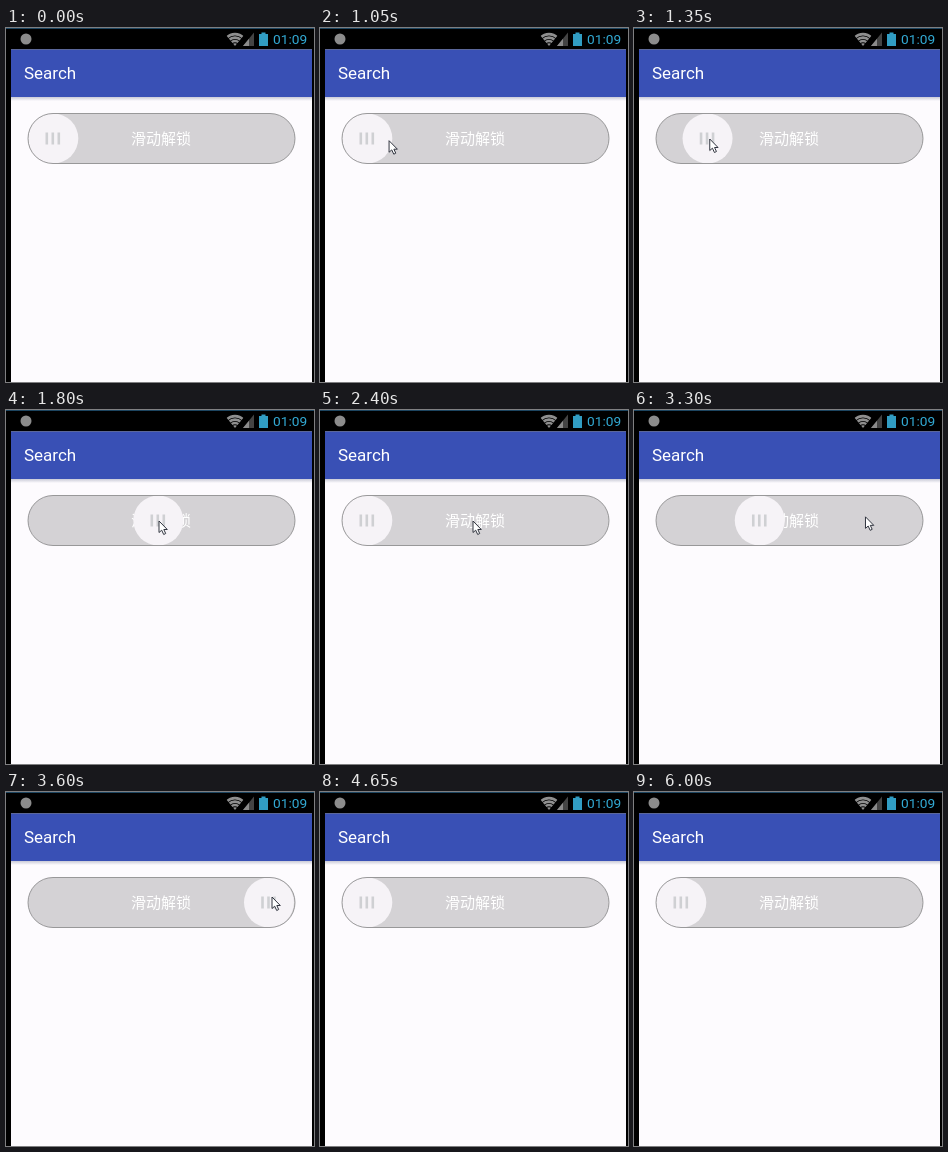
An HTML page for the animation above (6150 ms loop, 308 by 354 pixels).

```html
<!DOCTYPE html>
<html lang="zh">
<head>
<meta charset="utf-8">
<title>Slide to unlock</title>
<style>
  html, body { margin: 0; width: 100%; height: 100%; overflow: hidden; background: #000; }
  svg { display: block; width: 308px; height: 354px; }
  text { font-family: Roboto, "Noto Sans CJK SC", "Noto Sans CJK", sans-serif; }
</style>
</head>
<body>
<svg viewBox="0 0 308 354">
  <defs>
    <linearGradient id="shadow" x2="0" y2="1">
      <stop offset="0" stop-color="#8a8fa8" stop-opacity=".45"/>
      <stop offset="1" stop-color="#8a8fa8" stop-opacity="0"/>
    </linearGradient>
    <clipPath id="fan"><path d="M229 18L219.500 6.500V3H238.500V6.500Z"/></clipPath>
  </defs>

  <rect width="308" height="354"/>
  <rect width="308" height="1" fill="#1d4560"/>

  <!-- Status bar -->
  <circle cx="20" cy="11" r="5.5" fill="#8c8c8c"/>
  <g clip-path="url(#fan)" fill="none" stroke="#8f8f8f" stroke-width="2.700">
    <circle cx="229" cy="18" r="1.500"/>
    <circle cx="229" cy="18" r="5"/>
    <circle cx="229" cy="18" r="8.400"/>
    <circle cx="229" cy="18" r="11.800"/>
  </g>
  <path d="M237 18L248 4.500V18Z" fill="#444"/>
  <path d="M237 18L243 10.700V18Z" fill="#8b8b8b"/>
  <path d="M253 6H255.500V4.500H259.500V6H262V18H253Z" fill="#319dc3"/>
  <text x="267" y="16" font-size="13.700" fill="#32a9d3">01:09</text>

  <!-- App -->
  <rect x="5" y="21.500" width="301" height="333" fill="#fdfbfe"/>
  <rect x="5" y="69" width="301" height="4" fill="url(#shadow)"/>
  <rect x="5" y="21.500" width="301" height="47.500" fill="#3950b5"/>
  <text x="18" y="51" font-size="17" fill="#fff">Search</text>

  <!-- Slider -->
  <rect x="22" y="85.500" width="267" height="50" rx="25" fill="#d4d2d5"/>
  <text x="125" y="116" font-size="15" font-weight="500" fill="#fff">滑动解锁</text>
  <g id="knob">
    <circle r="25" fill="#f6f3f7"/>
    <path d="M-6.500-6V6M-.5-6V6M5.500-6V6" stroke="#cfd0d3" stroke-width="2.600"/>
  </g>
  <rect x="22" y="85.500" width="267" height="50" rx="25" fill="none" stroke="#858486" stroke-width=".8"/>

  <path id="cursor" d="M0 0V11.500L2.700 9.200L4.700 13.500L6.700 12.500L4.800 8.500H8.300Z"
        fill="#fff" stroke="#30343f" stroke-width="1" stroke-linejoin="round"/>
</svg>
<script>
const LOOP = 6150, TICK = 150;
const HOME = 47.3, END = 263, KNOB_Y = 110.5;
const FIRST_DRAG = 105, SECOND_DRAG = 113;

const knob = document.getElementById("knob");
const cursor = document.getElementById("cursor");
const place = (node, x, y) => node.setAttribute("transform", `translate(${x} ${y})`);
const ramp = (t, from, to) => Math.min(1, Math.max(0, (t - from) / (to - from)));

function draw(now) {
  const t = Math.floor((now % LOOP) / TICK) * TICK;

  const enter = ramp(t, 150, 1125);
  const drag = ramp(t, 1200, 1800);
  const springBack = ramp(t, 1950, 2400);
  const pull = ramp(t, 2550, 3450) ** 2;
  const leave = ramp(t, 3900, 4500);

  // The second drag passes the middle, so the knob snaps to the end and then resets.
  let knobX = HOME + FIRST_DRAG * (drag - springBack) + SECOND_DRAG * pull;
  if (t >= 3600) knobX = t < 3900 ? END : HOME;
  place(knob, knobX, KNOB_Y);

  place(cursor,
    298 - 248 * enter + 103 * drag + SECOND_DRAG * pull + 10 * leave,
    133 - 22 * enter - 6 * pull - 17 * leave);
  cursor.setAttribute("visibility", t >= 150 && t < 4650 ? "visible" : "hidden");
}

const start = performance.now();
function tick() {
  draw(performance.now() - start);
  requestAnimationFrame(tick);
}
tick();
</script>
</body>
</html>
```
